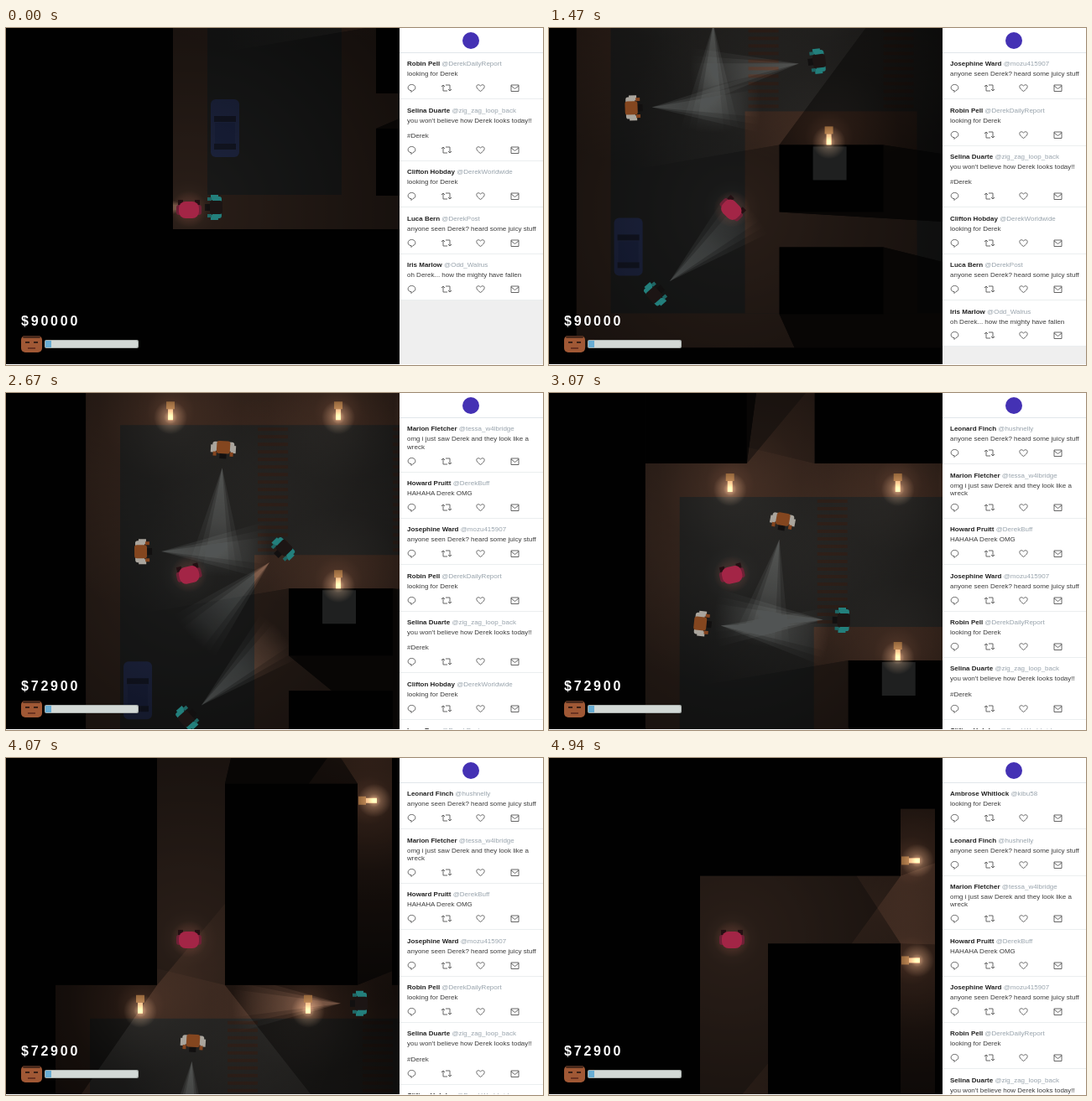
These frames come from a looping animation (640 by 402 pixels, 5000 ms). An HTML page with a canvas:

```html
<!DOCTYPE html>
<html lang="en">
<head>
<meta charset="utf-8">
<style>
html, body { margin: 0; width: 100%; height: 100%; overflow: hidden; background: #fff; }
body { position: relative; font: 8px/9.2px "Liberation Sans", Arial, sans-serif; color: #3c3c3c; }
canvas { position: absolute; left: 0; top: 0; }
#money { position: absolute; left: 18px; top: 341px; font: bold 16px/18px "Liberation Sans", Arial, sans-serif; letter-spacing: 2.8px; color: #fff; }
#feed { position: absolute; left: 469px; top: 0; width: 171px; height: 401px; overflow: hidden; background: #efefef; }
#top { height: 29px; background: #fff; border-bottom: 1px solid #e1e6ea; position: relative; }
#top i { position: absolute; left: 75px; top: 5px; width: 20px; height: 20px; border-radius: 50%; background: #4431b4; }
.post { position: relative; box-sizing: border-box; padding: 8.4px 0 0 9px; background: #fff; border-bottom: 1px solid #ebeeef; white-space: pre; }
.post b { color: #222; }
.post span { color: #98a3ac; }
.post p { margin: 2.8px 0 0; }
.post svg { position: absolute; left: 9px; bottom: 7px; fill: none; stroke: #555; stroke-width: .9; }
</style>
</head>
<body>
<canvas id="game" width="469" height="401"></canvas>
<div id="money"></div>
<div id="feed"><div id="top"><i></i></div></div>
<script>
const W = 469, H = 401, LOOP = 5000, STEP = 200 / 3, SPEED = .22;
const HITS = [1950, 2450];
const view = document.getElementById('game').getContext('2d');
const layer = () => Object.assign(document.createElement('canvas'), { width: W, height: H }).getContext('2d');
const lightMap = layer(), beam = layer();
const money = document.getElementById('money');

// Feed, newest first: time of arrival, name, handle, text
const seen = 'anyone seen Derek? heard some juicy stuff', search = 'looking for Derek';
const posts = [
  [4550, 'Ambrose Whitlock', '@kibu58', search],
  [2950, 'Leonard Finch', '@hushnelly', seen],
  [HITS[1], 'Marion Fletcher', '@tessa_w4lbridge', 'omg i just saw Derek and they look like a\nwreck'],
  [HITS[0], 'Howard Pruitt', '@DerekBuff', 'HAHAHA Derek OMG'],
  [1250, 'Josephine Ward', '@mozu415907', seen],
  [0, 'Robin Pell', '@DerekDailyReport', search],
  [0, 'Selina Duarte', '@zig_zag_loop_back', "you won't believe how Derek looks today!!\n\n#Derek"],
  [0, 'Clifton Hobday', '@DerekWorldwide', search],
  [0, 'Luca Bern', '@DerekPost', seen],
  [0, 'Iris Marlow', '@Odd_Walrus', 'oh Derek... how the mighty have fallen']
].map(([time, name, handle, text]) => {
  const el = document.createElement('div');
  el.className = 'post';
  el.style.height = 55.35 + 9.2 * (text.split('\n').length - 1) + 'px';
  el.innerHTML = `<b>${name}</b> <span>${handle}</span><p>${text}</p>
<svg width="140" height="11"><path d="M4 8.5C0 8 0 1.5 5.5 1.5S11 8 7 8.5L5 10.5V8.5Z"/>
<path d="M41 4l2-2 2 2M43 2v7h5M46 2h5v7M49 7l2 2 2-2"/>
<path d="M87.5 9.5C79 4 84 -.5 87.5 3C91 -.5 96 4 87.5 9.5Z"/>
<path d="M124 2h9v7.5h-9ZM124 3l4.5 3.5L133 3"/></svg>`;
  document.getElementById('feed').append(el);
  return { time, el };
});

// World: rectangles as left, top, right, bottom
const FAR = 1400, NORTH = -237;
const walls = [
  [-FAR, -FAR, 199, FAR], [199, 240, FAR, FAR],
  ...[-2, 120].map(y => [441, y, 565, y + 80]),
  [199, -FAR, 320, NORTH], [320, -FAR, 559, -558], [559, -FAR, 600, -638],
  [401, -477, 559, NORTH], [600, -FAR, FAR, NORTH]
];
const lamps = [
  ...[300, 500].map(x => ({ x, y: -213, turn: 0 })),
  { x: 500, y: -12, turn: 0 },
  ...[-457, -576].map(y => ({ x: 572, y, turn: -Math.PI / 2 }))
];

// Corners of the player's walk, as camera offsets
const walk = [[0, 0], [0, -155], [165, -140], [195, -170], [195, -288], [104, -235], [65, -405], [140, -480], [140, -800]];

const white = { coat: '#aaa59d', arm: '#85451f', hair: '#84461f' };
const teal = { coat: '#237f7c', arm: '#1f6664', hair: '#1c1514' };
const people = [
  { look: white, from: [265, -46], face: 0 },
  { look: white, from: [363, -170], face: 94 },
  { look: teal, from: [250, 214], to: [319, 153], start: 700, end: 2740, face: 180 },
  { look: teal, from: [488, -102], to: [435, -50], start: 1470, end: 2740, face: 175 },
  { look: teal, from: [720, -215], to: [563, -215], start: 3000, end: 4070, face: 180 }
];

const rad = deg => deg * Math.PI / 180;
const mix = (a, b, u) => a + (b - a) * u;
const angle = (a, b) => Math.atan2(b[1] - a[1], b[0] - a[0]);

function stroll(t) {
  let left = t * SPEED;
  for (let i = 1; i < walk.length; i++) {
    const a = walk[i - 1], b = walk[i], len = Math.hypot(b[0] - a[0], b[1] - a[1]);
    if (left < len) return [mix(a[0], b[0], left / len), mix(a[1], b[1], left / len), angle(a, b)];
    left -= len;
  }
}

// Standing people sway; walkers slow down and look where they go
function pose({ look, from, to = from, start = 0, end = 1, face }, t) {
  const u = Math.min(1, Math.max(0, (t - start) / (end - start)));
  const eased = 1 - (1 - u) ** 2;
  const sway = 8 * Math.cos((t - 670) / 430);
  const moving = u > 0 && u < 1;
  return {
    look, x: mix(from[0], to[0], eased), y: mix(from[1], to[1], eased),
    turn: moving ? angle(from, to) : rad(face + sway)
  };
}

function box(g, color, l, t, r, b) {
  g.fillStyle = color;
  g.fillRect(l, t, r - l, b - t);
}

function pill(g, color, l, t, r, b, radius) {
  g.fillStyle = color;
  g.beginPath();
  g.roundRect(l, t, r - l, b - t, radius);
  g.fill();
}

function placed(g, { x, y, turn }, draw) {
  g.save();
  g.translate(x, y);
  g.rotate(turn);
  draw();
  g.restore();
}

function glow(g, x, y, r, rgb, stops) {
  const grad = g.createRadialGradient(x, y, 0, x, y, r);
  stops.forEach(([pos, alpha]) => grad.addColorStop(pos, `rgba(${rgb},${alpha})`));
  g.fillStyle = grad;
}

// Adds one light to the light map, cut by the shadows of the walls
function shine(cx, cy, x, y, r, rgb, stops, heading = 0, spread = Math.PI) {
  if (x + r < cx || x - r > cx + W || y + r < cy || y - r > cy + H) return;
  beam.setTransform(1, 0, 0, 1, 0, 0);
  beam.clearRect(0, 0, W, H);
  beam.translate(-cx, -cy);
  glow(beam, x, y, r, rgb, stops);
  beam.beginPath();
  if (spread < Math.PI) beam.moveTo(x, y);
  beam.arc(x, y, r, heading - spread, heading + spread);
  beam.fill();
  beam.globalCompositeOperation = 'destination-out';
  beam.fillStyle = '#000';
  const far = ([px, py]) => [px + (px - x) * 60, py + (py - y) * 60];
  for (const [l, t, rt, b] of walls) {
    if (l > x + r || rt < x - r || t > y + r || b < y - r) continue;
    const corners = [[l, t], [rt, t], [rt, b], [l, b]];
    corners.forEach((p, i) => {
      const q = corners[(i + 1) % 4];
      beam.beginPath();
      [p, q, far(q), far(p)].forEach(v => beam.lineTo(...v));
      beam.fill();
    });
  }
  beam.globalCompositeOperation = 'source-over';
  lightMap.drawImage(beam.canvas, 0, 0);
}

// A flashlight is a stack of narrowing cones, so that its edge is soft
function flashlight(cx, cy, { x, y, turn }) {
  for (const spread of [.27, .2, .13])
    shine(cx, cy, x + 24 * Math.cos(turn), y + 24 * Math.sin(turn), 130, '250,255,255',
      [[0, .2], [.5, .14], [.8, .07], [1, 0]], turn, spread);
}

function drawGround(g) {
  const pavement = '#84614f';
  box(g, pavement, -FAR, -FAR, FAR, FAR);
  box(g, '#515454', 240, -197, FAR, 199);
  box(g, pavement, 400, -42, 605, 199);
  for (const x of [404, 565])
    for (let y = -194; y < -46; y += 9) box(g, '#65493c', x, y, x + 36, y + 4);
  walls.forEach(w => box(g, '#090909', ...w));
  pill(g, '#6079d8', 244, 85, 278, 154, 6);
  box(g, '#5069c8', 249, 113, 273, 138);
  for (const y of [105, 138]) box(g, '#3a4674', 248, y, 274, y + 7);
}

function drawLamp(g, lamp) {
  placed(g, lamp, () => {
    box(g, '#8f6238', -5, -12, 5, -3);
    box(g, '#c79d70', -3, -3, 3, 10);
    g.globalCompositeOperation = 'lighter';
    glow(g, 0, 7, 20, '255,205,160', [[0, .6], [.4, .22], [1, 0]]);
    g.fillRect(-20, -13, 40, 40);
  });
}

function drawPerson(g, { coat, arm, hair }) {
  pill(g, coat, -7, -13, 4, 13, 3);
  for (const side of [-1, 1]) {
    box(g, coat, -3, side * 12 - 3, 6, side * 12 + 3);
    box(g, arm, 5, side * 10 - 2, 10, side * 10 + 2);
  }
  box(g, '#121010', 7, -4, 13, 4);
  pill(g, hair, -8, -8, 7, 8, 3);
}

function drawPlayer(g) {
  for (const side of [-1, 1]) box(g, '#241013', 3, side * 10 - 3, 11, side * 10 + 3);
  pill(g, '#6f2036', -7, -15, 5, 15, 3);
  pill(g, '#a32546', -11, -12, 9, 12, 8);
}

function drawHud(g) {
  pill(g, '#a05835', 18, 367, 43, 387, 5);
  pill(g, '#4a2a1c', 20, 367, 41, 370, 2);
  for (const x of [23, 33]) box(g, '#3a2016', x, 374, x + 5, 376);
  box(g, '#6b3322', 26, 381, 35, 383);
  pill(g, '#a9afac', 46, 372, 158, 382, 2);
  pill(g, '#d3d9d6', 47, 373, 157, 381, 2);
  box(g, '#68add3', 47, 373, 54, 381);
}

function frame(now) {
  const t = Math.floor((now % LOOP) / STEP + .01) * STEP;
  const [cx, cy, turn] = stroll(t);
  const player = { x: cx + 218, y: cy + 216, turn };
  const crowd = people.map(p => pose(p, t));

  lightMap.globalCompositeOperation = 'source-over';
  box(lightMap, '#0e0e0e', 0, 0, W, H);
  lightMap.globalCompositeOperation = 'lighter';
  shine(cx, cy, player.x, player.y, 420, '255,248,243', [[0, .34], [.08, .24], [.3, .19], [.55, .13], [1, .04]]);
  lamps.forEach(({ x, y }) => shine(cx, cy, x, y, 240, '255,222,200', [[0, .4], [.12, .2], [.35, .1], [1, 0]]));
  crowd.forEach(p => flashlight(cx, cy, p));

  view.setTransform(1, 0, 0, 1, -cx, -cy);
  drawGround(view);
  view.globalCompositeOperation = 'multiply';
  view.drawImage(lightMap.canvas, cx, cy);
  view.globalCompositeOperation = 'source-over';
  box(view, '#1f2020', 481, 0, 521, 40);
  lamps.forEach(l => drawLamp(view, l));
  crowd.forEach(p => placed(view, p, () => drawPerson(view, p.look)));
  placed(view, player, () => {
    glow(view, 0, 0, 22, '150,85,70', [[0, .3], [.6, .18], [1, 0]]);
    view.fillRect(-22, -22, 44, 44);
    drawPlayer(view);
  });
  view.setTransform(1, 0, 0, 1, 0, 0);
  drawHud(view);

  // Every hit costs a tenth
  money.textContent = '$' + Math.round(90000 * .9 ** HITS.filter(h => t >= h).length);
  posts.forEach(p => { p.el.hidden = t < p.time; });
  requestAnimationFrame(frame);
}
requestAnimationFrame(frame);
</script>
</body>
</html>
```
